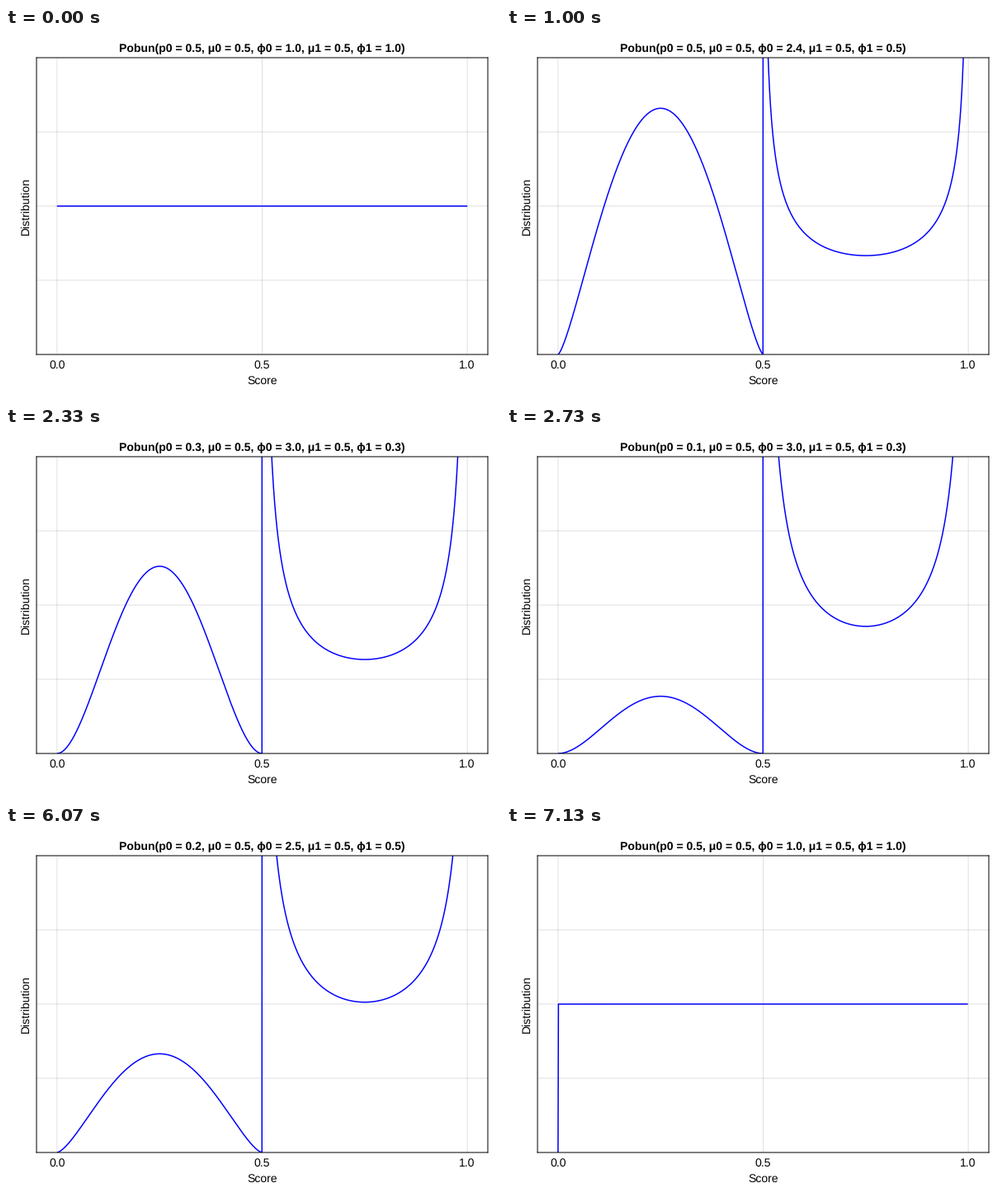
These frames come from a looping animation (600 px wide and 450 px high, 7990 ms). A matplotlib script:

```python
import math

import matplotlib.pyplot as plt
import numpy as np
from matplotlib.animation import FuncAnimation

WIDTH, HEIGHT, DPI = 600, 450, 100
LEFT, RIGHT, TOP, BOTTOM = 37, 584, 36, 396
FRAMES, LOOP_MS = 120, 7990
PX = 72 / DPI  # points per pixel

plt.rcParams["font.family"] = ["Liberation Sans", "DejaVu Sans"]
plt.rcParams["font.size"] = 14 * PX
plt.rcParams["text.hinting"] = "no_hinting"

x = np.linspace(0, 1, 1000)
left_x, right_x = 2 * x[x < 0.5], 2 * x[x >= 0.5] - 1


def ease(t, start, end):
    """Sine ease from 0 to 1 between two points of the timeline."""
    u = min(max((t - start) / (end - start), 0), 1)
    return (1 - math.cos(math.pi * u)) / 2


def lerp(a, b, u):
    return a + (b - a) * u


def last_step_before(step, end):
    """Hold the last step that lies strictly before the end of a move."""
    return min(step, math.ceil(end * (FRAMES - 1)) - 1) / (FRAMES - 1)


def parameters(step):
    if step / (FRAMES - 1) < 0.7:
        spread = ease(last_step_before(step, 0.2), 0, 0.2)
        shift = ease(last_step_before(step, 0.35), 0.25, 0.35)
    else:
        spread = shift = 1 - ease(last_step_before(step, 0.9), 0.7, 0.9)
    return lerp(0.5, 0.1, shift), lerp(1, 3, spread), lerp(1, 1 / 3, spread)


def beta_pdf(t, a):
    """Symmetric beta density."""
    with np.errstate(divide="ignore"):
        return math.gamma(2 * a) / math.gamma(a) ** 2 * (t * (1 - t)) ** (a - 1)


def label(px, py, text, **style):
    return fig.text(px / WIDTH, 1 - py / HEIGHT, text, ha="center",
                    va="baseline", rotation_mode="anchor", **style)


fig = plt.figure(figsize=(WIDTH / DPI, HEIGHT / DPI), dpi=DPI, facecolor="white")
ax = fig.add_axes([LEFT / WIDTH, 1 - BOTTOM / HEIGHT,
                   (RIGHT - LEFT) / WIDTH, (BOTTOM - TOP) / HEIGHT])
ax.set(xlim=(-0.05, 1.05), ylim=(0, 2), xticks=[], yticks=[])

grid_style = dict(color="black", alpha=0.12, lw=PX, zorder=1, snap=False)
for gx in (0, 0.5, 1):
    ax.axvline(gx, **grid_style)
    label(lerp(LEFT, RIGHT, (gx + 0.05) / 1.1), 412.5, f"{gx:.1f}")
for gy in (0.5, 1, 1.5):
    ax.axhline(gy, **grid_style)
for spine in ax.spines.values():
    spine.set(linewidth=PX, edgecolor="black", snap=False)

center = (LEFT + RIGHT) / 2
title = label(center, 29, "", weight="bold")
label(center, 432, "Score")
label(28, (TOP + BOTTOM) / 2, "Distribution", rotation=90)
curve, = ax.plot([], [], color="blue", lw=1.5 * PX, snap=False,
                 solid_capstyle="butt", solid_joinstyle="miter")


def draw(step):
    p0, phi0, phi1 = parameters(step)
    density = np.concatenate([2 * p0 * beta_pdf(left_x, phi0),
                              2 * (1 - p0) * beta_pdf(right_x, phi1)])
    curve.set_data(x, density)
    title.set_text(f"Pobun(p0 = {p0:.1f}, μ0 = 0.5, ϕ0 = {phi0:.1f}, "
                   f"μ1 = 0.5, ϕ1 = {phi1:.1f})")
    return curve, title


anim = FuncAnimation(fig, draw, frames=FRAMES, interval=LOOP_MS / FRAMES,
                     repeat=True, repeat_delay=0)
plt.show()
```
